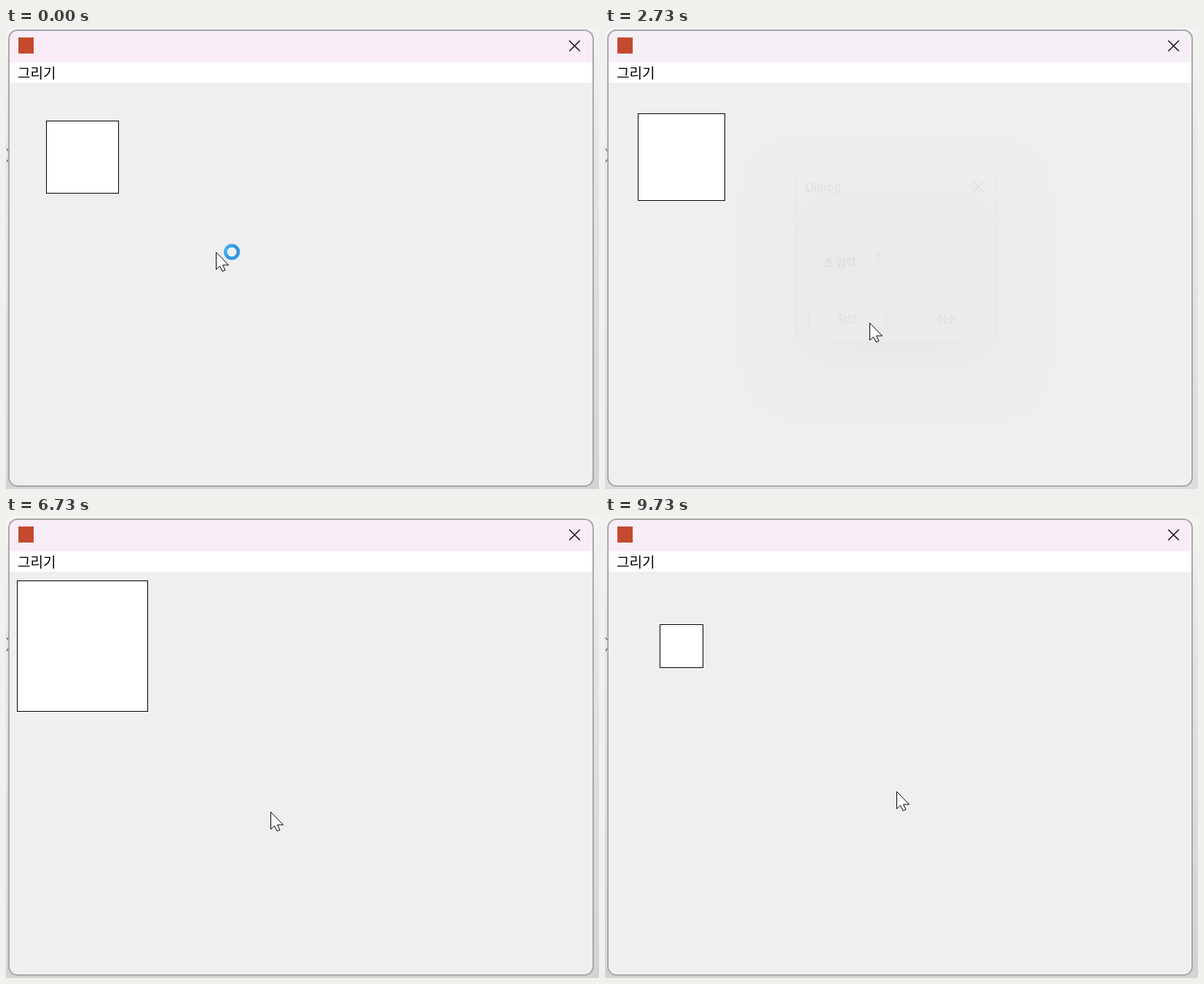
Animation, 814 px wide and 632 px high, one loop 9790 ms. Source, as an HTML page with a canvas:

```html
<!DOCTYPE html>
<html lang="ko">
<head>
<meta charset="utf-8">
<title>그리기</title>
<style>
  html, body { margin: 0; width: 100%; height: 100%; overflow: hidden; background: #e4e4e4; }
  canvas { display: block; }
</style>
</head>
<body>
<canvas id="stage" width="814" height="632"></canvas>
<script>
const ctx = document.getElementById('stage').getContext('2d');
const LOOP = 9790, STEP = 1000 / 15;
const KR = '"Noto Sans CJK KR", "Noto Sans CJK", "Noto Sans CJK JP", sans-serif';
const LATIN = '"Open Sans", "Noto Sans", sans-serif';

// Timer bursts: [first tick, number of ticks], 100 ms apart
const BURSTS = [[2720, 1], [2795, 3], [3060, 1], [3225, 8], [4125, 9],
                [5125, 11], [6295, 6], [6995, 23]];

// Pointer tip: [time, x, y, linear?]
const PATH = [
  [80, 288, 307], [940, 30, 50], [1050, 30, 50], [1260, 92, 107],
  [1390, 92, 107], [1800, 384, 316], [2210, 384, 316], [2590, 363, 404],
  [7600, 363, 404], [7800, 236, 286, 1], [7933, 180, 238, 1],
  [8133, 92, 112, 1], [8333, 45, 57, 1], [8530, 45, 57],
  [8867, 60, 66], [9170, 86, 138], [9200, 86, 138], [9733, 400, 376]
];

const clamp = v => Math.max(0, Math.min(1, v));
const ramp = (t, a, b) => clamp((t - a) / (b - a));
const smooth = p => p * p * (3 - 2 * p);
const mix = (a, b, p) => a + (b - a) * p;

function squareSize(t) {
  let n = 0;
  for (const [start, count] of BURSTS)
    if (t >= start) n += Math.min(count, Math.floor((t - start) / 100) + 1);
  return 40 + 20 * (8 - Math.abs((n + 3) % 16 - 8));
}

function pointerAt(t) {
  if (t <= PATH[0][0]) return PATH[0].slice(1, 3);
  for (let i = 1; i < PATH.length; i++) {
    const a = PATH[i - 1], b = PATH[i];
    if (t > b[0]) continue;
    const p = ramp(t, a[0], b[0]), e = b[3] ? p : smooth(p);
    return [mix(a[1], b[1], e), mix(a[2], b[2], e)];
  }
  return PATH[PATH.length - 1].slice(1, 3);
}

function box(x, y, w, h, r, fill, stroke, line = 1) {
  ctx.beginPath();
  ctx.roundRect(x, y, w, h, r);
  if (fill) { ctx.fillStyle = fill; ctx.fill(); }
  if (stroke) { ctx.strokeStyle = stroke; ctx.lineWidth = line; ctx.stroke(); }
}

function text(str, x, y, size, color, family = KR) {
  ctx.font = `${size}px ${family}`;
  ctx.fillStyle = color;
  ctx.fillText(str, x, y);
}

function cross(x, y, r, color, line) {
  ctx.beginPath();
  ctx.moveTo(x - r, y - r); ctx.lineTo(x + r, y + r);
  ctx.moveTo(x + r, y - r); ctx.lineTo(x - r, y + r);
  ctx.strokeStyle = color;
  ctx.lineWidth = line;
  ctx.stroke();
}

function shadow(color, blur, dy) {
  ctx.shadowColor = color;
  ctx.shadowBlur = blur;
  ctx.shadowOffsetY = dy;
}

function drawWindow(t) {
  const inactive = t > 1300 && t < 2800;
  const dimmed = t > 1300 && t < 2660;
  const desk = ctx.createLinearGradient(0, 0, 0, 632);
  desk.addColorStop(0, '#f3f3f3');
  desk.addColorStop(0.3, inactive ? '#e9e9e9' : '#e4e4e4');
  desk.addColorStop(1, inactive ? '#dcdcdc' : '#d3d3d3');
  ctx.fillStyle = desk;
  ctx.fillRect(0, 0, 814, 632);

  ctx.beginPath();
  ctx.arc(-9, 174.5, 13.5, -0.75, 0.75);
  ctx.strokeStyle = '#222';
  ctx.lineWidth = 1;
  ctx.stroke();

  ctx.save();
  ctx.beginPath();
  ctx.roundRect(4, 3, 802, 625, 12);
  ctx.clip();
  ctx.fillStyle = '#efefef';
  ctx.fillRect(0, 0, 814, 632);
  ctx.fillStyle = inactive ? '#f6eff6' : '#f9edf8';
  ctx.fillRect(0, 0, 814, 47);
  ctx.fillStyle = '#fff';
  ctx.fillRect(0, 47, 814, 28);
  ctx.restore();
  box(4, 3, 802, 625, 12, null, '#a9a9a9', 2);

  box(17, 13, 21, 22, 0, '#c5492f');
  cross(780.5, 24.5, 7.3, dimmed ? '#777' : '#111', 1.5);
  text('그리기', 16, 68.5, 19, dimmed ? '#555560' : '#000');
}

function drawSquare(t) {
  const s = squareSize(t);
  ctx.fillStyle = '#fff';
  ctx.strokeStyle = '#000';
  ctx.lineWidth = 1;
  ctx.fillRect(105 - s / 2, 177 - s / 2, s, s);
  ctx.strokeRect(105.5 - s / 2, 177.5 - s / 2, s - 1, s - 1);
}

function drawMenu(open, pick, row, t) {
  if (t < open || t > pick + 200) return;
  const labels = ['시작', '중지'], pointerY = pointerAt(t)[1];
  ctx.save();
  if (t < pick) {
    ctx.globalAlpha = ramp(t, open - 80, open + 90);
    box(6.5, 76.5, 165, 76, 7, '#f9f9f9', '#c9c9c9');
    labels.forEach((label, i) => {
      const y = 79 + 35 * i;
      if (pointerY >= y && pointerY < y + 35) box(13, y + 2, 152, 31, 4, '#efefef');
      text(label, 62, y + 24.5, 19, '#000');
    });
  } else {
    // Only the chosen row lingers and fades
    const y = 79 + 35 * row;
    ctx.globalAlpha = 1 - ramp(t, pick, pick + 200);
    box(8, y, 162, 35, 0, '#fbfbfb');
    box(13, y, 152, 35, 0, '#efefef');
    text(labels[row], 62, y + 24.5, 19, '#000');
  }
  ctx.restore();
}

function button(label, x, tx, edge) {
  box(x, 378.5, 101, 28, 4, '#fdfdfd', edge);
  text(label, tx, 397.5, 14, '#222');
}

function drawDialog(t) {
  if (t < 1260 || t >= 2780) return;
  const closing = t > 2610;
  const alpha = closing ? 1 - ramp(t, 2600, 2743) : ramp(t, 1233, 1400);
  const scale = closing ? mix(1.1, 1.042, ramp(t, 2600, 2733))
                        : mix(1, 1.1, 1 - (1 - ramp(t, 1333, 1533)) ** 2);
  ctx.save();
  ctx.globalAlpha = alpha;
  ctx.translate(313, 248);
  ctx.scale(scale, scale);
  ctx.translate(-313, -248);

  shadow('rgba(0,0,0,0.38)', 72, 30);
  box(265.5, 199, 262, 225, 9, '#efefef');
  shadow('transparent', 0, 0);
  box(265.5, 199, 262, 225, 9, '#efefef');
  box(265.5, 199, 262, 41, [9, 9, 0, 0], '#f7eff1');
  box(265.5, 199, 262, 225, 9, null, '#aaa', 1.3);
  text('Dialog', 276, 225, 16, '#333', LATIN);
  cross(504.5, 218.5, 6.6, '#222', 1.3);

  text('초 입력', 301, 324, 14, '#222');
  box(365, 301, 122, 43, [3, 3, 0, 0], '#fdfdfd');
  ctx.fillStyle = '#777';
  ctx.fillRect(365, 343, 122, 1);
  const selected = t > 1930 && t < 2190;
  if (selected) {
    ctx.fillStyle = '#0078d7';
    ctx.fillRect(368, 304, 9, 17);
  }
  text(t < 2190 ? '0' : '1', 368, 318, 15.5, selected ? '#fff' : '#222', LATIN);

  button('확인', 281.5, 319, '#2a95d5');
  button('취소', 411, 449, '#d2d2d2');
  ctx.restore();
}

function drawPointer(t) {
  const [px, py] = pointerAt(t), x = Math.round(px), y = Math.round(py);
  ctx.save();
  ctx.translate(x + 0.5, y + 0.5);
  ctx.lineWidth = 1;
  ctx.strokeStyle = '#000';
  ctx.beginPath();
  if (t > 1780 && t < 2260) {
    // Text caret pointer over the input field
    ctx.moveTo(-4, -11); ctx.lineTo(4, -11);
    ctx.moveTo(0, -11); ctx.lineTo(0, 11);
    ctx.moveTo(-4, 11); ctx.lineTo(4, 11);
    ctx.stroke();
  } else {
    ctx.moveTo(0, 0);
    for (const [dx, dy] of [[0, 23.5], [5, 19], [8.5, 26], [12.5, 24.5], [9, 17.5], [17, 17.5]])
      ctx.lineTo(dx, dy);
    ctx.closePath();
    ctx.fillStyle = '#fff';
    ctx.fill();
    ctx.stroke();
  }
  ctx.restore();

  if (t < 130) {
    const g = ctx.createLinearGradient(x + 11, y - 6, x + 33, y + 6);
    g.addColorStop(0, '#45bdf5');
    g.addColorStop(0.45, '#2f96ea');
    g.addColorStop(1, '#3794e8');
    ctx.beginPath();
    ctx.arc(x + 22, y, 8.8, 0, Math.PI * 2);
    ctx.strokeStyle = g;
    ctx.lineWidth = 4.6;
    ctx.stroke();
  }
}

function draw(now) {
  // The screen was refreshed 15 times a second
  const t = Math.floor((now % LOOP + 4) / STEP) * STEP;
  drawWindow(t);
  drawSquare(t);
  drawMenu(1060, 1260, 0, t);
  drawMenu(8460, 9190, 1, t);
  drawDialog(t);
  drawPointer(t);
}

const start = performance.now();
function tick() {
  draw(performance.now() - start);
  requestAnimationFrame(tick);
}
tick();
</script>
</body>
</html>
```
